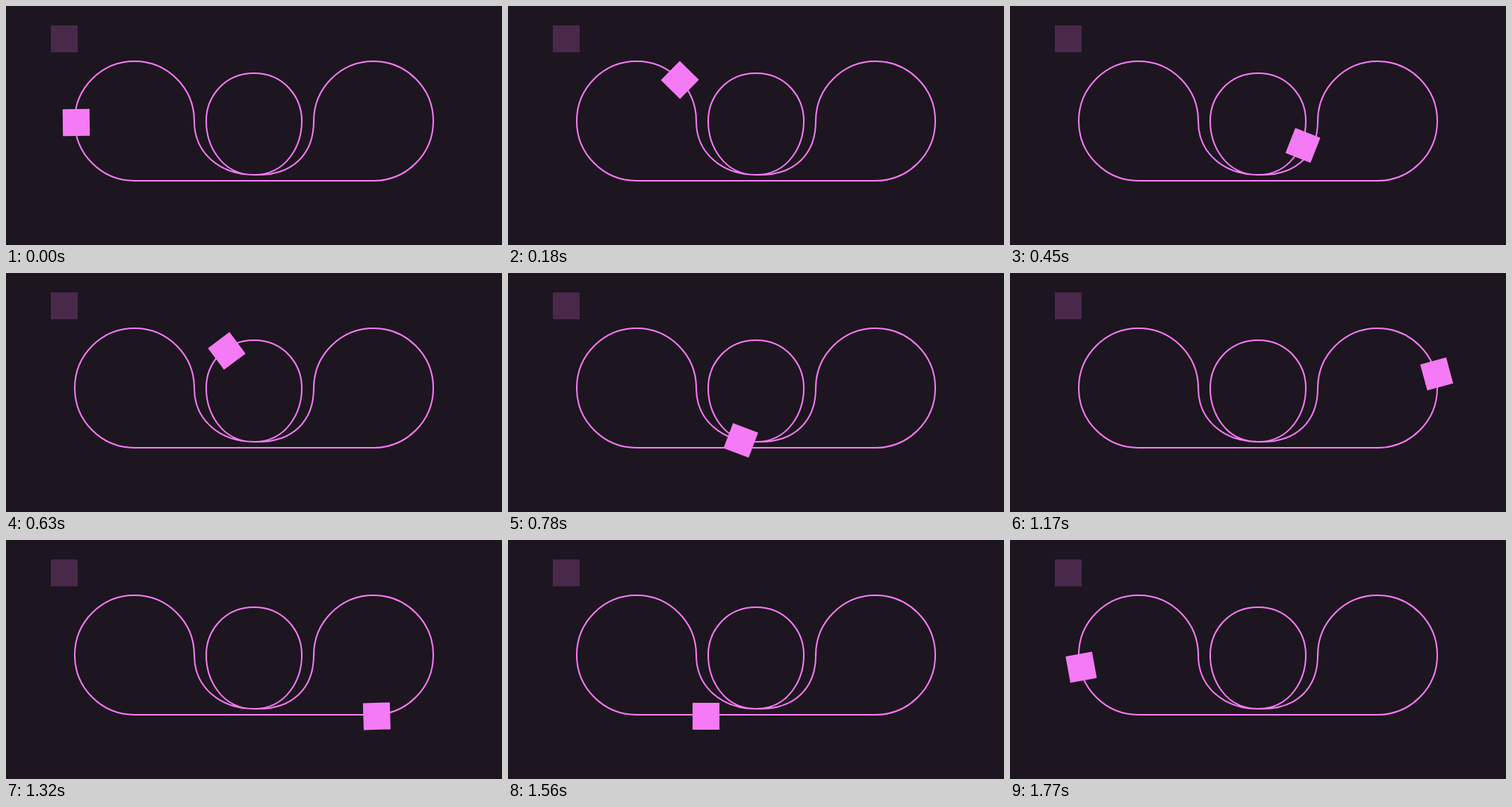
Animation, 664 px wide and 320 px high, one loop 1800 ms. Source, as an HTML page:

```html
<!DOCTYPE html>
<html lang="en">
<head>
<meta charset="utf-8">
<title>Square on a looping track</title>
<style>
  html, body { margin: 0; width: 100%; height: 100%; overflow: hidden; background: #1d151f; }
  svg { display: block; width: 664px; height: 320px; }
</style>
</head>
<body>
<svg viewBox="0 0 664 320">
  <g transform="translate(76 42) scale(2)" fill="#f57af5">
    <path id="track" fill="none" stroke="#f57af5" stroke-width="1" d="
      M8,56 C8,33.90861 25.90861,16 48,16
      C70.09139,16 88,33.90861 88,56
      C88,78.09139 105.90861,92 128,92
      C150.09139,92 160,72 160,56
      C160,40 148,24 128,24
      C108,24 96,40 96,56
      C96,72 105.90861,92 128,92
      C154,93 168,78 168,56
      C168,33.90861 185.90861,16 208,16
      C230.09139,16 248,33.90861 248,56
      C248,78.09139 230.09139,96 208,96
      L48,96 C25.90861,96 8,78.09139 8,56 Z"/>
    <rect x="-8" y="-8" width="18" height="18" opacity=".2"/>
    <rect id="runner" x="-9" y="-9" width="18" height="18"/>
  </g>
</svg>
<script>
  const LOOP = 1800;
  const STEP = 30;
  const SLACK = 8; // tolerance for late display refreshes
  const OFFSET = 1;

  const track = document.getElementById('track');
  const runner = document.getElementById('runner');
  const total = track.getTotalLength();

  // Distance travelled, in 30 ms steps; each loop opens at the closing point.
  function distanceAt(time) {
    const step = Math.floor(((time + SLACK) % LOOP) / STEP);
    return step === 0 ? total : (step + 0.5) * STEP / LOOP * total;
  }

  function render(time) {
    const distance = distanceAt(time);
    const here = track.getPointAtLength(distance);
    const behind = track.getPointAtLength(distance - 1);
    const ahead = track.getPointAtLength(distance + 1);
    const angle = Math.atan2(ahead.y - behind.y, ahead.x - behind.x) * 180 / Math.PI;
    runner.setAttribute('transform',
      `translate(${here.x + OFFSET} ${here.y + OFFSET}) rotate(${angle})`);
  }

  const start = performance.now();
  function tick() {
    render(performance.now() - start);
    requestAnimationFrame(tick);
  }
  tick();
</script>
</body>
</html>
```
